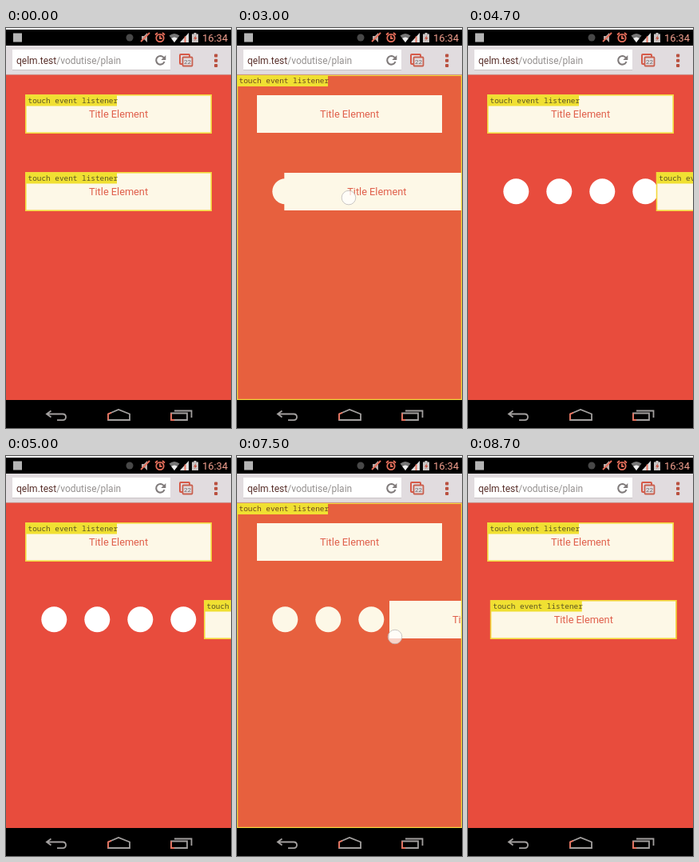
Animation of 282 by 500 pixels, one loop 8.8 s. Source, as an HTML page:

```html
<!DOCTYPE html>
<html lang="en">
<head>
<meta charset="utf-8">
<title>Swipe demo</title>
<style>
  html, body { margin: 0; width: 100%; height: 100%; overflow: hidden; background: #fff; }
  svg { display: block; width: 100%; height: 100%; }
  text { font-family: Roboto, sans-serif; white-space: pre; }
  .page { fill: #e84c3d; }
  .dots { fill: #fff; }
  .box { fill: #fdf8e7; }
  .title { font-size: 12.75px; fill: #e0604c; text-anchor: middle; }
  .frame { fill: none; stroke: #f3d83c; stroke-width: 1.6; }
  .tag { fill: #f0e032; }
  .tagText { font: 9.4px "Noto Sans Mono", monospace; fill: #5a5224; }
  .bodyMark { display: none; }
  .dragging .page { fill: #e7603e; }
  .dragging .dots { fill: #fdf8e7; }
  .dragging .cardMark { display: none; }
  .dragging .bodyMark { display: inline; }
  .bodyMark .tagText { fill: #6b4420; }
  .line { fill: none; stroke: #a3a09f; stroke-width: 1.8; }
  .warm { stroke: #e8705c; }
</style>
</head>
<body>
<svg id="stage" viewBox="0 0 282 500">
  <defs>
    <g id="card">
      <rect class="box" width="232" height="47"/>
      <text class="title" x="116" y="27.5">Title Element</text>
      <g class="cardMark">
        <rect class="frame" x="-.2" y="-.2" width="232.4" height="47.4"/>
        <rect class="tag" width="114" height="13.5"/>
        <text class="tagText" x="2.5" y="10">touch event listener</text>
      </g>
    </g>
  </defs>

  <rect class="page" y="58" width="282" height="407"/>
  <g class="dots">
    <circle cx="60.3" cy="204.3" r="16"/>
    <circle cx="114.3" cy="204.3" r="16"/>
    <circle cx="168.3" cy="204.3" r="16"/>
    <circle cx="222.3" cy="204.3" r="16"/>
  </g>
  <use href="#card" x="25" y="84"/>
  <use href="#card" id="slider" y="181"/>
  <g class="bodyMark">
    <rect class="frame" x=".6" y="59.4" width="280.8" height="405" style="stroke-width:1.2"/>
    <rect class="tag" y="59" width="114" height="14"/>
    <text class="tagText" x="2.5" y="69">touch event listener</text>
  </g>
  <circle id="finger" r="8.8" fill="#fff" fill-opacity=".72" stroke="#b9b4b4" stroke-opacity=".75"/>

  <!-- status bar -->
  <rect y="2" width="282" height="20"/>
  <rect x="9" y="6.5" width="11" height="11" fill="#b4b4b4"/>
  <circle cx="155" cy="12" r="4.5" fill="#484848"/>
  <path d="M170 10h3l4-4v12l-4-4h-3z" fill="#b8aaa6"/>
  <path class="line warm" d="M169 17L180 6" stroke-width="1.6"/>
  <g class="line warm">
    <circle cx="193" cy="12.5" r="4.7"/>
    <path d="M193 9.5v3.5h2.5M187 8.5l3-2.5M199 8.5l-3-2.5"/>
  </g>
  <path d="M204.5 9.5Q211 4.500 217.500 9.500L211 18z" fill="#777"/>
  <path d="M207.200 13Q211 10 214.800 13L211 18z" fill="#eee"/>
  <path d="M218 18L229 6v12z" fill="#ddd"/>
  <path class="line warm" d="M224.500 10.500V18" stroke-width="1"/>
  <path d="M233 7.500h2.500V6h3v1.500H241V18h-8z" fill="#c8c4c3"/>
  <path d="M238 9l-3 4.500h2l-1 3 3.500-4.500h-2z" fill="#c9503f"/>
  <text x="246" y="16.800" font-size="12.9" fill="#f3a08f">16:34</text>

  <!-- toolbar -->
  <rect y="22" width="282" height="36" fill="#e1dcdf"/>
  <path d="M0 58.300h282" stroke="#c5aaa8" stroke-width=".8"/>
  <rect x="8" y="27" width="198" height="25" fill="#fff"/>
  <path d="M8 52.500h198" stroke="#c9c3c5"/>
  <text x="13" y="44.700" font-size="12" fill="#94908f"><tspan fill="#59302b">qelm.test</tspan>/vodutise/plain</text>
  <path d="M198 37.500A5.300 5.300 0 1 0 198.500 42" fill="none" stroke="#807b7b" stroke-width="2.100"/>
  <path d="M200.300 34v6h-6z" fill="#807b7b"/>
  <rect x="218" y="33" width="12" height="12" rx="1" fill="none" stroke="#d65a48" stroke-width="2"/>
  <rect x="221.500" y="36.500" width="12" height="11" rx="1" fill="#e1dcdf" stroke="#c9604f" stroke-width="1.800"/>
  <text x="227.500" y="45" font-size="8" fill="#6f6868" text-anchor="middle">22</text>
  <g fill="#b9503f">
    <rect x="261" y="32.500" width="4.200" height="4" rx="1"/>
    <rect x="261" y="38.700" width="4.200" height="4" rx="1"/>
    <rect x="261" y="45" width="4.200" height="4" rx="1"/>
  </g>

  <!-- navigation bar -->
  <rect y="465" width="282" height="35"/>
  <g class="line">
    <path d="M56.500 478.500L51 482.500l5.500 4M51 482.500h20q4 0 4 3.800t-4 3.800H64"/>
    <path d="M128 490v-7.500L141 477l14 5.500V490z"/>
    <path class="warm" d="M128 490v-7.500l4-1.700"/>
    <path d="M207 481.500h20v8.500h-20zM211 478.500h21.500V487"/>
    <path class="warm" d="M211 490h-4v-8.500"/>
  </g>
</svg>
<script>
  const LOOP = 8800, STEP = 100;
  const stage = document.getElementById('stage');
  const slider = document.getElementById('slider');
  const finger = document.getElementById('finger');
  const easeOut = p => 1 - (1 - p) ** 2;

  // Each key: [time, value, easing towards the next key]
  const cardX = [
    [2700, 25], [3400, 105], [3900, 163], [4500, 200, easeOut], [4900, 249],
    [6700, 249], [7000, 240], [7200, 227], [7500, 191], [8100, 117],
    [8400, 85, easeOut], [8800, 25]
  ];
  const fingerX = [
    [2600, 95], [3400, 185], [3900, 243], [4500, 280],
    [6400, 275], [6700, 275], [7000, 255], [7200, 234], [7500, 198], [8100, 124], [8400, 92]
  ];
  const fingerY = [[2600, 213], [3900, 210], [4500, 210], [6400, 220], [6700, 220], [7500, 226], [8400, 225]];

  function valueAt(keys, t) {
    const next = keys.findIndex(key => key[0] > t);
    if (next === 0) return keys[0][1];
    if (next < 0) return keys[keys.length - 1][1];
    const [t0, v0, ease = p => p] = keys[next - 1];
    const [t1, v1] = keys[next];
    return v0 + (v1 - v0) * ease((t - t0) / (t1 - t0));
  }

  const within = (t, ...spans) => spans.some(([a, b]) => t >= a && t < b);

  function draw(now) {
    const t = Math.floor((now % LOOP + 0.5) / STEP) * STEP % LOOP;
    stage.classList.toggle('dragging', within(t, [2700, 4500], [6500, 8400]));
    slider.setAttribute('x', valueAt(cardX, t));
    finger.setAttribute('cx', valueAt(fingerX, t));
    finger.setAttribute('cy', valueAt(fingerY, t));
    finger.style.display = within(t, [2600, 4500], [6400, 8400]) ? '' : 'none';
  }

  const start = performance.now();
  function tick() {
    draw(performance.now() - start);
    requestAnimationFrame(tick);
  }
  tick();
</script>
</body>
</html>
```
